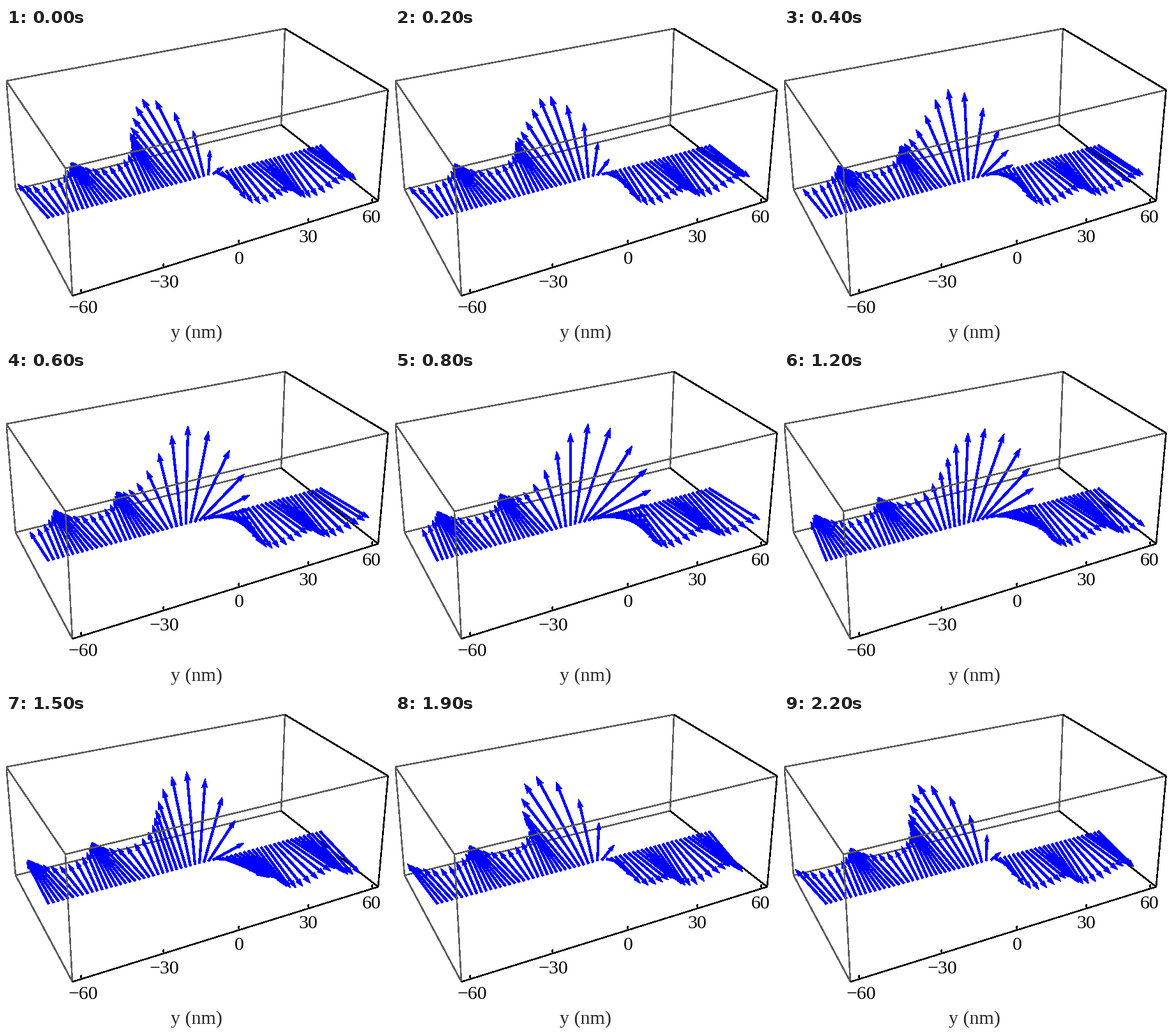
Write a matplotlib script that moves like this. It is 600 by 494 pixels and loops after 2.3 s.

```python
import numpy as np
import matplotlib.pyplot as plt
from matplotlib.animation import FuncAnimation
from matplotlib.collections import LineCollection, PolyCollection

W, H, DPI = 600, 494, 100
FRAMES, STEP = 23, 100        # frame count, ms per frame
PERIOD = 2230                 # precession period in ms
COUNT = 61
BLUE, GRAY, BLACK = "#0000ff", "#5c5c5c", "#000000"
PX = 72 / DPI                 # points per pixel

spin = np.arange(COUNT)


def sech2(x):
    return 1 / np.cosh(x) ** 2


def ramp(x):
    return (1 + np.tanh(x / 2)) / 2


def polar(amp, degrees):
    return amp * np.exp(1j * np.radians(degrees))


# Foot of every arrow: a straight chain seen in perspective
base_x = (67 + 7.85 * spin) / (1 + 0.00156 * spin)
base = np.column_stack([base_x, 298 - 0.2682 * (base_x - 67)])

# Rest direction: the chain turns over from the left to the right domain
rest_x = np.tanh((spin - 31) / 2.1) * (36 + spin ** 2 / 120)
rest_y = 56 * np.tanh((spin - 33.3) / 5) - 107 * sech2((spin - 30.4) / 3.75)

# Precession as complex amplitudes: a swinging wall in the middle
# sends one spin wave to the left and one to the right.
left, right = ramp(28 - spin), ramp(spin - 36)
left_phase = 519 - 26.7 * spin
right_phase = 120 + 29.5 * (spin - 48)
s = spin - 31.2
tilt = (spin - 30.4) / 2.3

swing_x = (polar(78 * sech2(s / 3.4), 143 + 1.5 * s ** 2)
           + polar(13.5 * left, left_phase)
           + polar(9 * right, right_phase) + polar(6 * right, 165))
swing_y = (polar(30 * tilt * np.exp((1 - tilt ** 2) / 2), 108)
           + polar(12 * sech2((spin - 32.5) / 4), 30)
           + polar(11 * left, left_phase - 83)
           + polar(10 * right, right_phase + 148))


def arrows(t):
    """Shaft segments and notched heads at time t in ms."""
    turn = np.exp(-2j * np.pi * t / PERIOD)
    off = np.column_stack([rest_x + (swing_x * turn).real,
                           rest_y + (swing_y * turn).real])
    size = np.maximum(np.hypot(*off.T), 1)[:, None]
    along = off / size
    side = along[:, ::-1] * (-1, 1)
    head = np.minimum(8.5 + 0.035 * size, size)
    tip = base + off
    notch = tip - 0.8 * head * along
    back = tip - head * along
    half = 0.32 * head * side
    heads = np.stack([tip, back + half, notch, back - half], axis=1)
    return np.stack([base, notch], axis=1), heads


fig = plt.figure(figsize=(W / DPI, H / DPI), dpi=DPI, facecolor="white")
ax = fig.add_axes([0, 0, 1, 1])
ax.set(xlim=(0, W), ylim=(H, 0))
ax.axis("off")

# Box corners: back/front, left/right, top/bottom
BLT, BRT, FRT, FLT = (0.5, 83), (437, 1), (598.5, 97), (93, 220)
BLB, BRB, FRB, FLB = (15, 253), (431, 152), (583, 271), (104, 420)


def edges(segments, color, z):
    ax.add_collection(LineCollection(
        segments, colors=color, linewidths=1.5 * PX, zorder=z,
        antialiaseds=False))


edges([(BLT, BRT), (BLT, BLB), (BRT, BRB), (BLB, BRB)], GRAY, 1)
edges([(BRB, FRB)], BLACK, 1)
edges([(BLT, FLT), (BLB, FLB), (FLT, FLB), (FLT, FRT)], GRAY, 4)
edges([(BRT, FRT), (FRT, FRB), (FLB, FRB)], BLACK, 4)

FONT = dict(family="Liberation Serif", ha="center", va="baseline",
            fontsize=30 * PX)
TICKS = [("\u221260", (118, 416), (120.5, 447)),
         ("\u221230", (247, 376), (247.5, 407)),
         ("0", (365, 339), (365, 370)),
         ("30", (474, 305), (473.5, 336)),
         ("60", (574, 274), (572.5, 305))]
for label, (x, y), (tx, ty) in TICKS:
    edges([((x, y), (x - 0.5, y - 6))], BLACK, 4)
    ax.text(tx, ty, label, color=BLACK, **FONT)
ax.text(299, 486, "y (nm)", color="#2a2a2a", **FONT)

shafts = LineCollection([], colors=BLUE, linewidths=3.2 * PX, zorder=2,
                        antialiaseds=False)
points = PolyCollection([], facecolors=BLUE, edgecolors=BLUE, zorder=3,
                        linewidths=0.5 * PX, antialiaseds=False)
ax.add_collection(shafts)
ax.add_collection(points)


def update(k):
    lines, heads = arrows(k * STEP)
    shafts.set_segments(lines)
    points.set_verts(heads)
    return shafts, points


anim = FuncAnimation(fig, update, frames=FRAMES, interval=STEP,
                     repeat=True, repeat_delay=0, blit=False)
plt.show()
```
